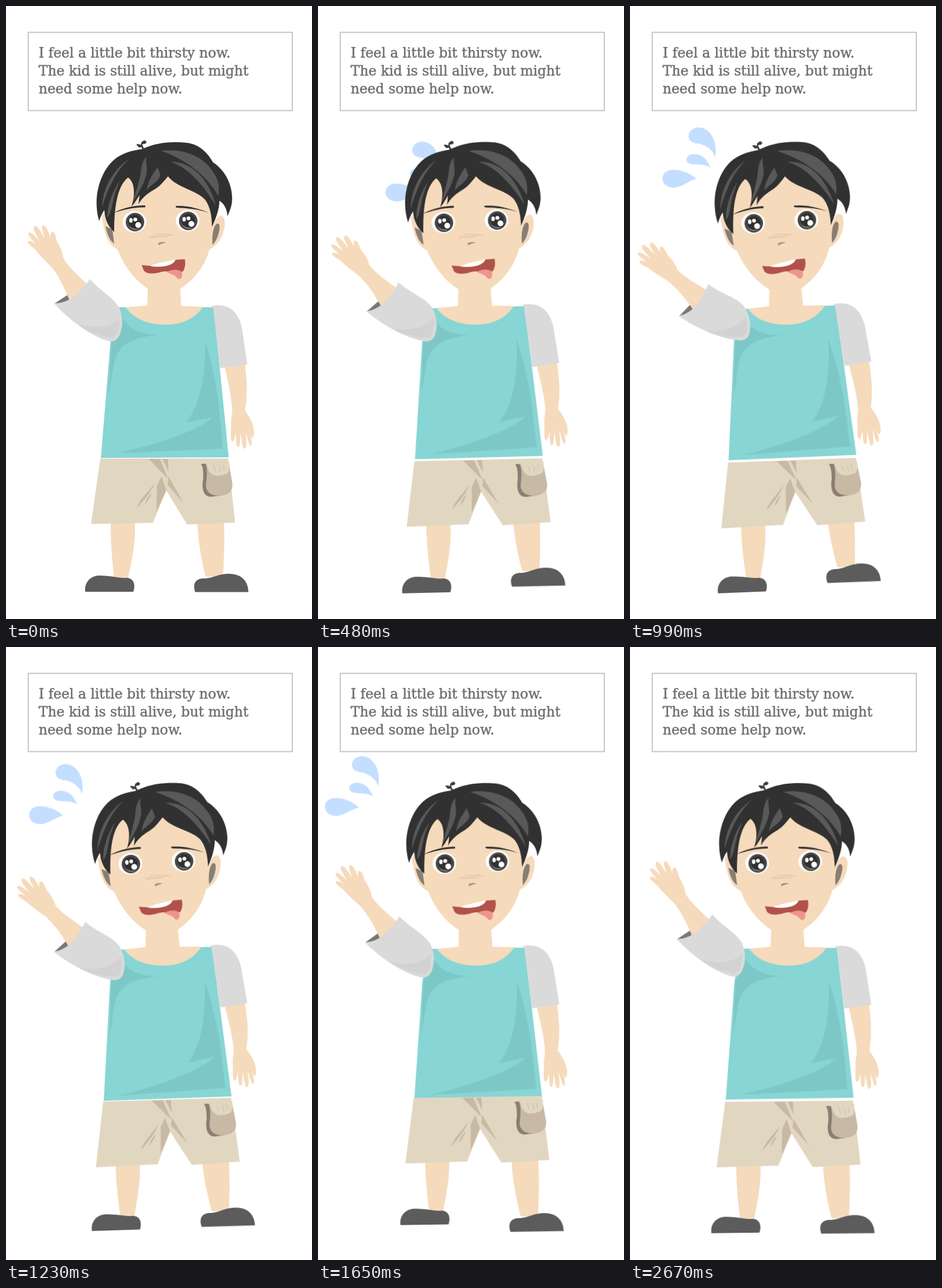
Animation of 529x1058 px, one loop 2.7 s. Source, as an HTML page without scripts:

```html
<!DOCTYPE html>
<html lang="en">
<head>
<meta charset="utf-8">
<title>Thirsty kid</title>
<style>
html, body { margin: 0; width: 100%; height: 100%; overflow: hidden; background: #fff; }
svg { display: block; width: 100vw; height: 100vh; }
text { font: 23.5px "DejaVu Serif", serif; fill: #6e6e6e; stroke: #6e6e6e; stroke-width: .5; }
.skin { fill: #f5dabb; }
.hair { fill: #313131; }
.shine { fill: #595959; }
.grey { fill: #dadada; }
.shade { fill: #7dc8c7; }
.shorts { fill: #e1d7c1; }
.fold { fill: #c7b9a4; }
.shoe { fill: #5c5c5c; }
.drops { fill: #c4deff; }

/* three equal phases: lean out, lean back, rest */
.body, .arm, .drops, .pants, .footL, .footR { animation: 2.7s linear infinite; }
.body { animation-name: lean; transform-origin: 274px 612px; }
.arm { animation-name: wave; transform-origin: 168px 498px; }
.drops { animation-name: fly; }
.pants { animation-name: pants; }
.footL { animation-name: footL; }
.footR { animation-name: footR; }
@keyframes lean {
  0% { transform: rotate(0deg); }
  33.333% { transform: rotate(-2.35deg); }
  66.667%, 100% { transform: rotate(-.53deg); }
}
@keyframes wave {
  0% { transform: translate(0px, 0px) rotate(0deg); }
  33.333% { transform: translate(0px, 0px) rotate(-12.2deg); }
  66.667%, 100% { transform: translate(-1.5px, -11px) rotate(0deg); }
}
@keyframes fly {
  0% { transform: translate(226px, 261px); }
  33.333% { transform: translate(123px, 206px); }
  66.667% { transform: translate(53px, 181px); opacity: 1; }
  100% { transform: translate(53px, 181px); opacity: 0; }
}
@keyframes pants {
  0% { transform: translateY(0px); }
  33.333% { transform: translateY(4px); }
  66.667% { transform: translateY(-6px); }
  100% { transform: translateY(3.3px); }
}
@keyframes footL {
  0% { transform: translateY(0px); }
  33.333% { transform: translateY(-.5px); }
  66.667% { transform: translateY(-18px); }
  100% { transform: translateY(0px); }
}
@keyframes footR {
  0% { transform: translateY(0px); }
  33.333% { transform: translateY(-15px); }
  66.667%, 100% { transform: translateY(1.5px); }
}
</style>
</head>
<body>
<svg viewBox="0 0 529 1058">
  <rect x="38.500" y="45.500" width="456.500" height="135" fill="#fff" stroke="#c4c4c4" stroke-width="2"/>
  <text x="56.500" y="89">I feel a little bit thirsty now.</text>
  <text x="56.500" y="120">The kid is still alive, but might</text>
  <text x="56.500" y="151">need some help now.</text>

  <g class="body">
    <g class="drops">
      <path d="M0 14C2-1 25-6 38 12C47 25 47 40 45 53C40 38 28 30 14 28C4 26 0 22 0 14Z"/>
      <path d="M-5 54C-3 44 14 44 24 52C31 58 34 66 36 71C27 64 17 65 7 64C-2 63-6 59-5 54Z"/>
      <path d="M11 89C-3 92-13 102-29 103C-45 102-51 90-46 80C-39 67-9 70 11 89Z"/>
    </g>

    <g class="footL">
      <path class="skin" d="M181 860H223V893C224 930 217 958 211 988H187C183 955 181 925 181 893Z"/>
      <path class="shoe" d="M137 1011C135 995 146 983 162 983C183 983 194 988 210 987C222 989 224 1000 220 1011Z"/>
    </g>
    <g class="footR">
      <path class="skin" d="M331 860H377V893C378 925 377 950 375 985H345C338 955 332 925 331 893Z"/>
      <path class="shoe" d="M327 1011.500C322 997 328 988 341 988C358 988 366 980 386 980C408 980 419 994 419 1011.500Z"/>
    </g>

    <path fill="#87d5d4" d="M193 520H359L385 779L164 780L181 575Z"/>
    <path class="shade" d="M201 538C212 558 235 567 264 568C220 571 196 583 188 612C183 635 182 650 177 668L183 575ZM344 577C346 640 335 690 311 719L357 710C330 735 250 760 190 772L375 764L367 680C361 640 352 600 344 577Z"/>

    <g class="pants">
      <path class="shorts" d="M163 781H384L396 891.500L313 895L277 836L254 892L147 894Z"/>
      <path class="fold" d="M247 782L280 816L266 782ZM271 782L281 804L280 782ZM277 836L269 812L261 828L260 873ZM281 812L307 858L279 826ZM257 823C250 842 238 852 226 867C231 850 246 840 257 823ZM252 840Q243 848 240 860Q249 850 252 840Z"/>
      <path fill="#8a7e72" d="M337 790H348V822C346 838 352 842 372 845L354 847C340 846 338 832 341 815C341 805 341 796 337 790Z"/>
      <path class="fold" d="M345 790C349 801 347 815 345.500 828C347 843 360 846 372 845C388 843 393 835 391 822L385 787Z"/>
      <path class="shorts" d="M346 789.500L386 787C387 800 385 809 378 808C370 812 358 812 354 806C348 802 350 796 346 789.500Z"/>
      <path fill="none" stroke="#c7b9a4" d="M358 793Q362 798 362 803M367 792Q371 797 370 805M375 792Q378 797 376 802"/>
    </g>

    <path class="skin" d="M377 618L412 612C417 645 418 672 413 698C420 708 425 716 428 728C430 738 428 745 426 745C423 744 422 736 420 731C424 745 427 758 423 759C419 758 418 745 414 736C416 750 417 764 412 764C408 763 408 748 405 738C405 748 405 761 401 761C397 760 398 746 397 736C396 745 394 752 391 752C387 750 389 735 389 725C388 714 392 705 391 695C389 670 383 645 377 618Z"/>
    <path class="grey" d="M355 518C386 511 407 530 410 570L417 619L370 625L358 520Z"/>

    <path class="skin" d="M246 475L244 517L207 520C222 542 250 550 276 550C303 550 325 541 341 519L303 518L300 475Z"/>

    <g class="arm">
      <path fill="#777" d="M83 514L106 499L114 506L98 517Z"/>
      <path class="skin" d="M112 514C102 487 92 468 80 452C68 440 58 430 51 421C46 416 38 411 38 407C39 403 46 406 52 411C46 404 36 395 39 391C43 389 52 399 58 405C53 396 45 384 49 380C54 377 61 392 67 400C64 390 60 381 64 379C69 377 74 391 77 400C77 394 77 389 81 390C86 391 86 402 89 408C94 416 98 424 99 435C108 450 125 466 140 480Z"/>
      <path class="grey" d="M145 471C160 490 185 502 196 521C202 535 202 550 199 560C195 574 190 579 180 579C150 572 110 543 83 513C95 514 108 508 117 502C128 492 140 480 145 471Z"/>
      <path fill="#d2d2d2" d="M124 549C150 556 178 557 196 540C197 562 190 572 182 573C160 569 140 561 124 549Z"/>
    </g>

    <g class="head">
      <path class="skin" d="M166 362C169 390 175 412 193 420L190 385L180 350ZM358 378C364 361 376 356 378 372C379 388 372 410 352 420L352 390Z"/>
      <path fill="#877e74" d="M172 380C175 395 180 406 187 410L184 386ZM357 412C356 395 358 382 364 376C370 373 371 383 367 394C365 402 361 408 357 412Z"/>
      <path class="skin" d="M184 300V385C190 430 215 470 250 491C270 500 285 497 300 489C330 470 350 440 355 405L364 345L340 290L280 260L200 270Z"/>

      <path class="hair" d="M161 371C150 335 160 290 186 266C200 254 218 249 235 247C258 236 285 233 312 236C331 238 347 250 358 270C385 287 397 324 388 350L383 363C382 351 378 342 369 336C369 350 363 367 356 381C356 362 353 346 344 334C328 317 296 314 280 294C271 305 265 312 256 317C244 324 236 330 229 342L231 326C227 332 223 340 217 346C223 328 224 305 211 296C196 308 187 335 187 390C178 382 171 370 170 352C166 358 163 365 161 371Z"/>
      <path class="shine" d="M213 264C190 278 167 310 166 348C176 315 190 285 213 264ZM197 301C185 318 176 340 175 365C181 362 184 340 188 325ZM243 260C231 272 235 290 229 305C226 318 221 330 220 338C229 322 238 308 241 296C247 283 240 272 243 260ZM262 278C254 290 246 300 243 318C250 308 262 305 267 292ZM268 250C310 245 342 262 357 285C370 302 369 318 367 328C352 300 320 268 268 250ZM285 269C316 268 349 292 363 345C348 320 320 280 285 269Z"/>
      <g fill="none" stroke="#3c3c3c" stroke-width="2.500">
        <path d="M237 247Q235 239 226 239.500M238 247Q230 235 241 233"/>
      </g>
      <path fill="#3c3c3c" d="M226 239Q234 238 234 243Q230 247 226 239ZM236 235Q242 231 243 235Q241 239 236 238Z"/>

      <path class="hair" d="M186 357C205 347 225 344 240 344Q242 346 240 347.500C222 347 205 351 186 357ZM294 345C315 344 335 350 351 357C330 350 312 349 295 348Q292 346 294 345Z"/>
      <g id="eye">
        <ellipse cx="222" cy="372.500" rx="20.500" ry="18.500" fill="#fff"/>
        <circle cx="223" cy="373" r="16" fill="#484848"/>
        <circle cx="223" cy="372" r="11.500" fill="#303030"/>
        <path fill="#858585" d="M212 380Q219 389 230 385.500Q219 385 212 380Z"/>
        <g fill="#fff">
          <ellipse cx="216" cy="370" rx="3" ry="4"/>
          <circle cx="223.500" cy="368.500" r="3.300"/>
          <circle cx="228.500" cy="378" r="5"/>
        </g>
      </g>
      <use href="#eye" x="92" y="-2"/>

      <path fill="none" stroke="#dcc2a2" d="M248 397.500L291 395M256 393.500H284M247 400L280 398"/>
      <path fill="#a59282" d="M263 409Q270 406 277 408.500Q268 410 264 413Z"/>
      <path fill="#b1524a" d="M234.500 447C252 450 275 449 292 438L309 437C311 446 309 453 306 458C295 462 280 456 268 459C255 463 242 463 238 456Z"/>
      <path fill="#fff" d="M249 448.500C262 443 280 441 293 437C292 443 285 447 275 449C264 451 256 450 249 448.500Z"/>
      <path fill="#ef948c" d="M278 459C288 453 300 455 304 459C306 468 302 473 297 471C292 464 288 464 278 459Z"/>
    </g>
  </g>
</svg>
</body>
</html>
```
